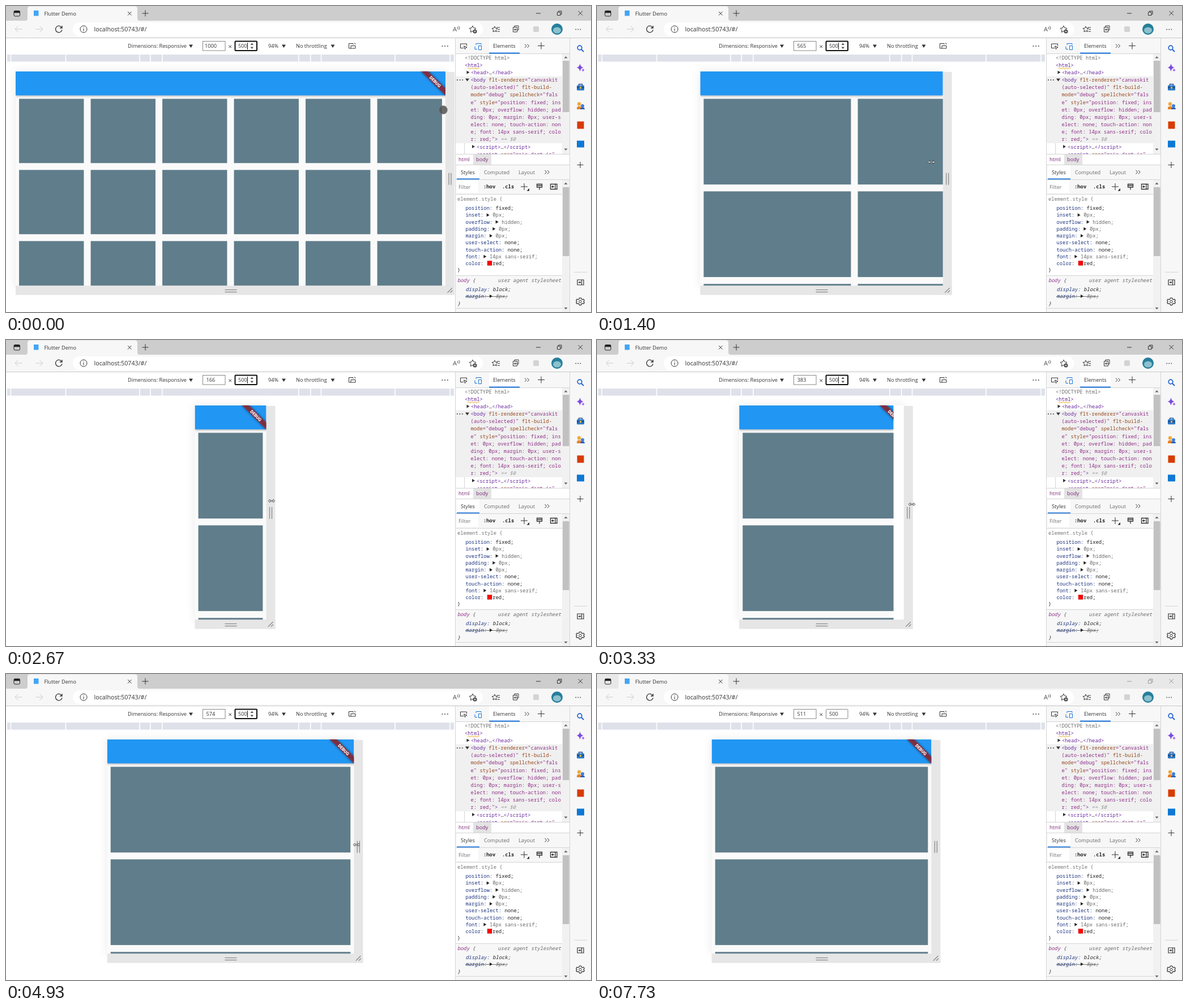
Write an HTML page that moves like this. It is 1033 by 542 pixels and loops after 7790 ms.

```html
<!DOCTYPE html>
<html lang="en">
<head>
<meta charset="utf-8">
<title>Responsive grid</title>
<style>
html, body { margin: 0; width: 100%; height: 100%; overflow: hidden; background: #fff; }
svg { display: block; }
text { font: 9.2px "Open Sans", "Noto Sans", sans-serif; fill: #333; white-space: pre; }
.mono text { font: 8.85px "Noto Sans Mono", "DejaVu Sans Mono", monospace; }
.line { fill: none; stroke: #333; stroke-width: 1; }
.bar { fill: #f7f7f7; }
.rule { stroke: #d4d4d4; stroke-width: 1; }
.muted { fill: #757575; }
.tag { fill: #6b2b9e; }
.attr { fill: #96491f; }
.val { fill: #8e2f86; }
.prop { fill: #1d347f; }
.soft { fill: #6a6a6a; }
.mono .ital { font-style: italic; }
.mono .bold { font-weight: 700; fill: #222; }
.strip { fill: #e6e6e6; }
#grid rect { fill: #607d8b; }
#page { filter: drop-shadow(0 0 8px rgba(0,0,0,.09)); }
#appbar { filter: drop-shadow(0 1.5px 2px rgba(0,0,0,.32)); }
#ribbon .shade { fill: #000; fill-opacity: .5; filter: blur(2px); }
#ribbon text { font: 900 7.75px Roboto, sans-serif; fill: #fff; }
</style>
</head>
<body>
<svg id="stage" width="1033" height="542" viewBox="0 0 1033 542">
  <!-- title bar -->
  <rect id="titlebar" width="1033" height="26"/>
  <g class="line">
    <rect x="14" y="8.500" width="10.500" height="9.500" rx="2" stroke="#222"/>
    <path d="M14 10.500H24.500" stroke-width="3.500" stroke="#222"/>
  </g>
  <path class="bar" d="M34 26Q38 26 38 22V5Q38 .5 42.500 .5H227.500Q232 .5 232 5V22Q232 26 236 26Z"/>
  <rect x="49" y="8" width="8.500" height="9.500" fill="#42a5f5"/>
  <text x="67.500" y="16.500">Flutter Demo</text>
  <path class="line" d="M215 10l6.500 6.500m0-6.500l-6.500 6.500M240.500 13h11M246 7.500v11"/>
  <path id="buttons" class="line" d="M936 13h8M973.500 11h5.500v5.500h-5.500zM975.500 11v-2h5.500v5.500h-2M1010.500 9l7.500 7.500m0-7.500l-7.500 7.500"/>

  <!-- toolbar -->
  <rect class="bar" y="26" width="1033" height="31"/>
  <rect x="118" y="29" width="724" height="24.500" rx="12" fill="#fff"/>
  <path class="line" style="stroke:#cbcbcb" d="M28.500 41h-12.500m5.500-5.500l-5.500 5.500l5.500 5.500M52.500 41h12.500m-5.500-5.500l5.500 5.500l-5.500 5.500"/>
  <path class="line" style="stroke-width:1.300" d="M98.500 38.500A5.800 5.800 0 1 0 99 42M99 35v4h-4"/>
  <circle class="line" cx="137" cy="41" r="6"/>
  <path class="line" d="M137 40v4.500M137 37.500v1.200"/>
  <text x="155.500" y="45" style="font-size:10.700px">localhost:50743/#/</text>
  <text x="789" y="45" style="font-size:11px;fill:#555">A</text>
  <path class="line" style="stroke:#555" d="M797 37q2 2 0 4M799.500 35.500q3 3.500 0 6.500"/>
  <path class="line" d="M824 35l1.800 3.800l4.200.6l-3 2.900l.7 4.200l-3.700-2l-3.700 2l.7-4.200l-3-2.900l4.200-.6z"/>
  <circle cx="828" cy="45" r="3.500" fill="#444"/><path d="M826 45h4M828 43v4" stroke="#fff" stroke-width=".8"/>
  <path class="line" d="M863 36l1.500 3.200l3.500.5l-2.600 2.500l.6 3.600l-3-1.700l-3 1.700l.6-3.600l-2.600-2.500l3.500-.5zM866.500 38h5.500M868.500 41.500h3.500M867.500 45h4.500"/>
  <path class="line" d="M898 37.500v-2.500h7v7.500h-2.500M895.500 37.500h7v8.500h-7zM899 39.500v4.500M896.800 41.700h4.500"/>
  <rect x="931" y="36" width="10" height="10" rx="2" fill="#d3d3d3"/>
  <circle cx="973" cy="41" r="10" fill="#257f9b"/><ellipse cx="973" cy="43" rx="7" ry="5.500" fill="#8cc1cd"/>
  <path d="M1005.500 41.500h1.500m2.500 0h1.500m2.500 0h1.500" stroke="#333" stroke-width="1.700"/>

  <!-- device toolbar -->
  <path class="rule" d="M0 56.500H1033" style="stroke:#c9c9c9"/>
  <text x="215" y="74.300">Dimensions: Responsive</text>
  <path d="M323 68.500h7l-3.500 5.500zM487 68.500h7l-3.500 5.500zM573.500 68.500h7l-3.500 5.500z" fill="#333"/>
  <rect class="line" x="347.500" y="62.500" width="39.500" height="16.500" style="stroke:#888"/>
  <text id="width" x="361.500" y="74.300" text-anchor="middle"></text>
  <path class="line" d="M393.500 69.500l4.500 4.500m0-4.500l-4.500 4.500"/>
  <rect class="line" id="field" x="404.500" y="62.500" width="38.500" height="16.500" rx="1"/>
  <text x="410" y="74.300">500</text>
  <g id="focus">
    <path d="M431.500 69h5.500l-2.750-3.500zM431.500 72.500h5.500l-2.750 3.500z" fill="#555"/>
    <path id="caret" d="M426.500 65V77" stroke="#111"/>
  </g>
  <text x="463" y="74.300">94%</text>
  <text x="512" y="74.300">No throttling</text>
  <path class="line" d="M613 68.500v-2h-7.500v8.500h3.500M609 70.500h8v4.500h-8zM615 65.500q2 .5 2 2.500"/>
  <path d="M769.500 71h1.800m2.900 0h1.800m2.900 0h1.800" stroke="#333" stroke-width="1.700"/>
  <rect x="2" y="86" width="789" height="12.500" fill="#dee1e9"/>
  <path d="M8.500 86v13M105.500 86v13M236 86v13M254.800 86v13M275.800 86v13M516.800 86v13M537.700 86v13M556.500 86v13M687 86v13M784 86v13" stroke="#fff" stroke-width="1.600"/>

  <!-- emulated device -->
  <g id="device">
    <rect id="page" y="0" height="379.500" fill="#fff"/>
    <rect id="side" class="strip" y="1" width="16" height="395"/>
    <rect id="foot" class="strip" y="379.500" height="16.500"/>
    <svg id="view" height="379.500">
      <rect width="100%" height="100%" fill="#fafafa"/>
      <g id="grid"></g>
      <rect id="appbar" width="100%" height="42.500" fill="#2196f3"/>
      <g id="ribbon">
        <g transform="rotate(45)">
          <rect class="shade" x="-30.360" y="21.250" width="60.720" height="9.100"/>
          <rect x="-30.360" y="21.250" width="60.720" height="9.100" fill="#b71c1c" fill-opacity=".63"/>
          <text y="28.500" text-anchor="middle">DEBUG</text>
        </g>
      </g>
    </svg>
    <path id="grips" fill="none" stroke="#8a8a8a" stroke-width="1.300"/>
  </g>

  <!-- developer tools -->
  <rect x="793" y="57" width="203" height="485" fill="#fff"/>
  <rect class="bar" x="794" y="57" width="202" height="27"/>
  <rect x="853" y="57" width="54" height="27" fill="#fff"/>
  <path class="rule" d="M793.500 57V542M794 84.500H996M794 262.500H996M794 281.500H996M794 333.500H996M794 477.500H982"/>
  <path d="M853 83.500h54" stroke="#1a73d9" stroke-width="1.800"/>
  <path class="line" d="M808 74.500h-5.500v-7.500h11v3.500M808.500 71l5.500 2.200l-2.500 1l-1 2.500zM916 67.500l3 3.200l-3 3.200m4.500-6.400l3 3.200l-3 3.200M939 70.500h12M945 64.500v12"/>
  <path class="line" style="stroke:#1a73d9" d="M832 76.500h-4v-5M830 69v-2.500h9v2M834.500 70.500h5v7h-5z"/>
  <text x="860" y="74.300">Elements</text>
  <svg x="794" y="85" width="188" height="177" viewBox="794 85 188 177" class="mono">
    <rect x="794" y="124.500" width="188" height="118.500" fill="#f0f0f0"/>
    <path class="rule" d="M809.500 243v20"/>
    <text x="810" y="94.500" class="soft">&lt;!DOCTYPE html&gt;</text>
    <text x="810" y="107.500" class="tag">&lt;html&gt;</text>
    <path d="M815 110.500q1.500-2 3 0t3 0t3 0t3 0t3 0t3 0t3 0" fill="none" stroke="#e5a000"/>
    <text x="821" y="121" class="tag">&lt;head&gt;<tspan fill="#333">…</tspan>&lt;/head&gt;</text>
    <path d="M813.500 114.500v6l5-3zM811 128.500h7l-3.500 5zM823 246v6l5-3z" fill="#333"/>
    <path d="M796 131h1.800m2.700 0h1.800m2.700 0h1.800" stroke="#333" stroke-width="1.600"/>
    <text x="820.500" y="134" class="val"><tspan class="tag">&lt;body</tspan> <tspan class="attr">flt-renderer</tspan>="canvaskit</text>
    <text x="820.500" y="147.200" class="val">(auto-selected)" <tspan class="attr">flt-build-</tspan></text>
    <text x="820.500" y="160.300" class="val"><tspan class="attr">mode</tspan>="debug" <tspan class="attr">spellcheck</tspan>="fals</text>
    <text x="820.500" y="173.500" class="val">e" <tspan class="attr">style</tspan>="position: fixed; ins</text>
    <text x="820.500" y="186.700" class="val">et: 0px; overflow: hidden; pad</text>
    <text x="820.500" y="199.900" class="val">ding: 0px; margin: 0px; user-s</text>
    <text x="820.500" y="213" class="val">elect: none; touch-action: non</text>
    <text x="820.500" y="226.200" class="val">e; font: 14px sans-serif; colo</text>
    <text x="820.500" y="239.400" class="val">r: red;"<tspan class="tag">&gt;</tspan><tspan class="ital" fill="#999"> == $0</tspan></text>
    <text x="831" y="252.500" class="tag">&lt;script&gt;<tspan fill="#333">…</tspan>&lt;/script&gt;</text>
    <text x="831" y="265.500" class="val"><tspan class="tag">&lt;script</tspan> <tspan class="attr">src</tspan>="main.dart.js"</text>
  </svg>
  <rect x="825" y="263" width="32" height="18" fill="#e3e3e3"/>
  <text x="799" y="274.800" style="fill:#7b2778">html</text>
  <text x="830" y="274.800" style="fill:#7b2778">body</text>
  <rect class="bar" x="794" y="282" width="202" height="51"/>
  <rect x="796" y="282" width="40" height="25" fill="#fff"/>
  <path class="rule" d="M794 307.500H996"/>
  <path d="M796 306.300h40" stroke="#1a73d9" stroke-width="1.800"/>
  <text x="803" y="298">Styles</text>
  <text x="844" y="298" class="soft">Computed</text>
  <text x="905" y="298" class="soft">Layout</text>
  <path class="line" d="M951.500 291l3 3.300l-3 3.300m4.500-6.600l3 3.300l-3 3.300M909 320h12M915 314v12"/>
  <path d="M924 323v4.500h-4.500z" fill="#222"/>
  <rect x="796" y="310" width="38" height="21" fill="#fff"/>
  <text x="799" y="323.800" class="muted">Filter</text>
  <g class="mono"><text x="843" y="323" class="bold">:hov</text><text x="876" y="323" class="bold">.cls</text></g>
  <path class="line" style="stroke-width:1.300" d="M937.500 315.500h9v5.500h-9zM942 321v4.500M938 318h8M961.500 315.500h11.500v9h-11.500zM970 315.500v9M968 320h-4m1.500-1.700l-1.700 1.700l1.700 1.700"/>
  <rect class="bar" x="794" y="478" width="188" height="64"/>
  <path class="rule" d="M794 535.500H982"/>
  <g class="mono">
    <text x="797" y="345" class="muted">element.style {</text>
    <g id="rules"></g>
    <text x="797" y="471">}</text>
    <text x="797" y="488.500" class="val ital">body <tspan fill="#555">{</tspan></text>
    <text x="980" y="488.500" class="soft ital" text-anchor="end">user agent stylesheet</text>
    <text x="811.500" y="505" class="prop ital">display: <tspan fill="#222">block;</tspan></text>
    <text x="811.500" y="517" class="prop ital">margin:   <tspan class="soft">8px;</tspan></text>
    <path d="M811 514.500H886" stroke="#555" stroke-width=".8"/>
    <path d="M854 511v6l5-3z" fill="#222"/>
    <text x="797" y="529.500" class="ital">}</text>
  </g>
  <rect x="850" y="451.500" width="8" height="8" fill="#f00" stroke="#a33" stroke-width=".5"/>
  <rect x="982" y="85" width="13" height="177" fill="#f1f1f1"/>
  <rect x="982" y="308" width="13" height="234" fill="#f1f1f1"/>
  <path d="M983 97h11.500v91h-11.500zM983 321h11.500v122h-11.500z" fill="#c1c1c1"/>
  <path d="M985.500 92.500h6l-3-3.500zM985.500 252.500h6l-3 3.500zM985.500 316h6l-3-3.500zM985.500 534h6l-3 3.500z" fill="#666"/>

  <!-- side bar -->
  <rect class="bar" x="996" y="57" width="37" height="485"/>
  <path class="rule" d="M995.500 57V542M1003 471.500h23"/>
  <circle cx="1013" cy="74" r="3.800" fill="none" stroke="#1d5fd0" stroke-width="1.700"/>
  <path d="M1016 77l4 4" stroke="#1d5fd0" stroke-width="1.900"/>
  <path d="M1013.500 102q1 6 6 7q-5 1-6 7q-1-6-6-7q5-1 6-7z" fill="#7b4be0"/>
  <path d="M1019 110.500q.5 2.500 3 3q-2.500.5-3 3q-.5-2.500-3-3q2.500-.5 3-3z" fill="#9a5cf0"/>
  <path d="M1011.500 141v-2.500h6v2.500" fill="none" stroke="#1b4f9c" stroke-width="1.400"/>
  <rect x="1008" y="140.500" width="13" height="9" rx="1.300" fill="#2876c9"/>
  <path d="M1008 143.500h13v2h-13z" fill="#164a8c"/><path d="M1013 143h3v3.500h-3z" fill="#f3b33c"/>
  <circle cx="1012" cy="173.500" r="3.200" fill="#f2a93b"/><path d="M1008 183v-2q0-3.500 4-3.500t4 3.500v2z" fill="#e88324"/>
  <circle cx="1018" cy="177" r="3" fill="#3d7fdb"/><path d="M1014 183q0-3.500 4-3.500t4 3.500z" fill="#2d5fb8"/>
  <rect x="1008.500" y="204.500" width="12" height="13" fill="#d83b01"/>
  <rect x="1008" y="238.500" width="13" height="12" fill="#0f78d4"/>
  <path class="line" d="M1008.500 281.500h11M1014 276v11"/>
  <path class="line" style="stroke-width:1.200" d="M1009 485h11v9h-11zM1016.500 485v9M1010.500 489.500h4m-1.700-1.700l1.700 1.700l-1.700 1.700"/>
  <circle class="line" cx="1014" cy="523.500" r="2.200"/>
  <path class="line" style="stroke-width:1.200;stroke-linejoin:round" d="M1012.500 517h3l.5 2l2 .9l2-.7l1.300 2.500l-1.500 1.600l1.500 1.800l-1.300 2.400l-2-.6l-2 1l-.5 1.900h-3l-.5-1.900l-2-1l-2 .6l-1.300-2.400l1.500-1.800l-1.500-1.600l1.300-2.500l2 .7l2-.9z"/>

  <!-- pointers -->
  <g id="pointer">
    <circle r="7.500" fill="#555" fill-opacity=".88" stroke="#888" stroke-opacity=".5"/>
    <path d="M-6 0l3-2.600v1.800h6v-1.800l3 2.600l-3 2.600v-1.800h-6v1.800z" fill="#fff" stroke="#222" stroke-width=".7"/>
    <path d="M0 0v14l3.200-3l2.300 5.200l2.200-1l-2.300-5h4.500z" fill="#fff" stroke="#111" stroke-width=".9"/>
  </g>
</svg>
<script>
const LOOP = 7790, SCALE = .759, MID = 396.5, TOP = 115.8, GUTTER = 8 * SCALE;
const BLUR = 7730, GLYPH = 5.31;
const $ = id => document.getElementById(id);
const NS = 'http://www.w3.org/2000/svg';
const set = (el, attrs) => { for (const k in attrs) el.setAttribute(k, attrs[k]); };
const show = (el, on) => { el.style.display = on ? '' : 'none'; };

// moments at which the screen refreshes
const STEPS = [0, 130, 200, 270, 330, 400, 530, 600, 870, 930, 1070, 1200, 1270, 1330, 1470, 1530,
  1670, 1870, 1930, 2070, 2130, 2270, 2330, 2400, 2670, 2730, 2870, 2930, 3130, 3270, 3330, 3530,
  3670, 3730, 3800, 3870, 3930, 4070, 4130, 4930, 5000, 5070, 5270, 5330, 5400, 5470, 5530,
  5670, 5730, 5800, 5870, 5930, 6070, 6130, 6200, 6270, 6330, 6470, 6530, 6600, 6670, 6730,
  6800, 6870, 6930, 7000, 7070, 7200, BLUR];

const WIDTH = [[0, 1000], [600, 1000], [870, 996], [930, 976], [1070, 870], [1470, 400], [1670, 356],
  [1930, 248], [2130, 195], [2330, 166], [2670, 166], [2930, 241], [3130, 310], [3270, 359],
  [3330, 383], [3530, 436], [3930, 567], [4130, 574], [5070, 574], [5270, 566], [5530, 522],
  [5670, 518], [5930, 511]];

const POINTER = [[0, 772, 184], [600, 781, 271], [870, 779, 272], [930, 766, 273], [1070, 703, 274],
  [1470, 530, 278], [1670, 509.5, 280], [1930, 478, 282], [2330, 464, 284], [2670, 469, 285],
  [2930, 512, 288], [3130, 535, 290], [3330, 556, 291], [3930, 619, 297], [4130, 622, 300],
  [4930, 619, 302.5], [5530, 601, 303], [5930, 597, 305], [6070, 601, 307], [6330, 617, 320],
  [7000, 643, 482]];

function sample(keys, t, dim = 1) {
  const i = keys.findIndex(k => k[0] > t);
  if (i < 0) return keys[keys.length - 1][dim];
  const a = keys[i - 1], b = keys[i];
  return a[dim] + (b[dim] - a[dim]) * (t - a[0]) / (b[0] - a[0]);
}

const cells = Array.from({ length: 18 }, () => $('grid').appendChild(document.createElementNS(NS, 'rect')));

function layGrid(w) {
  const cols = w >= 992 ? 6 : w >= 768 ? 3 : w >= 576 ? 2 : 1;
  const high = (cols > 2 ? 150 : 200) * SCALE;
  const pitch = w * SCALE / cols;
  cells.forEach((cell, i) => {
    show(cell, i < cols * 3);
    set(cell, {
      x: i % cols * pitch + GUTTER,
      y: 42.5 + GUTTER + Math.floor(i / cols) * (high + 2 * GUTTER),
      width: pitch - 2 * GUTTER, height: high
    });
  });
}

function layDevice(w, layout, canvas) {
  const px = w * SCALE, mid = px / 2;
  set($('device'), { transform: `translate(${MID - mid} ${TOP})` });
  set($('page'), { width: px });
  set($('side'), { x: px });
  set($('foot'), { width: px + 16 });
  set($('view'), { width: canvas * SCALE });
  set($('ribbon'), { transform: `translate(${layout * SCALE} 0)` });
  set($('grips'), {
    d: `M${px + 6} 180v21m4 0v-21M${mid - 10} 386.800h21m0 4h-21` +
       `M${px + 3.5} 392l8.500-8.500M${px + 8.500} 392l4-4`
  });
  layGrid(layout);
  $('width').textContent = Math.round(w);
}

function layPointer(t) {
  const p = $('pointer'), kind = t < 530 ? 0 : t < 6070 ? 1 : 2;
  show(p, t < 7200);
  set(p, { transform: `translate(${sample(POINTER, t)} ${sample(POINTER, t, 2)})` });
  [...p.children].forEach((shape, i) => show(shape, i === kind));
}

function layFocus(t) {
  const active = t < BLUR;
  const dark = t >= 530 && t < 870 || t >= 6270 && t < 6730 || t >= 7200;
  show($('focus'), active);
  show($('caret'), !dark);
  $('field').style.cssText = active ? 'stroke:#111;stroke-width:2' : 'stroke:#888';
  set($('titlebar'), { fill: active ? '#cdcdcd' : '#e8e8e8' });
  $('buttons').style.stroke = active ? '#333' : '#999';
}

// declarations; ">" after the colon marks a shorthand with an expander
['position: fixed;', 'inset:>0px;', 'overflow:>hidden;', 'padding:>0px;', 'margin:>0px;',
  'user-select: none;', 'touch-action: none;', 'font:>14px sans-serif;', 'color:   red;']
  .forEach((rule, i) => {
    const y = 361 + i * 12.25, at = rule.indexOf(':') + 1;
    const folded = rule[at] === '>';
    const name = rule.slice(0, at), value = rule.slice(at + folded);
    const x = 811.5 + (at + 1) * GLYPH;
    $('rules').innerHTML += `<text x="811.5" y="${y}" class="prop">${name}${folded ? '   ' : ''}` +
      `<tspan ${folded ? 'class="soft"' : 'fill="#222"'}>${value}</tspan></text>` +
      (folded ? `<path d="M${x} ${y - 6}v6l5-3z" fill="#222"/>` : '');
  });

let shown = -1;
function tick(now) {
  const t = now % LOOP;
  let i = STEPS.length - 1;
  while (STEPS[i] > t) i--;
  if (i !== shown) {
    shown = i;
    const at = n => sample(WIDTH, STEPS[Math.max(0, i - n)]);
    const w = at(0);
    // the app lays out late when shrinking; its canvas grows late
    layDevice(w, Math.max(w, at(2)), Math.min(w, at(1)));
    layPointer(STEPS[i]);
    layFocus(STEPS[i]);
  }
}
const start = performance.now();
(function loop() {
  tick(Math.max(0, performance.now() - start));
  requestAnimationFrame(loop);
})();
</script>
</body>
</html>
```
